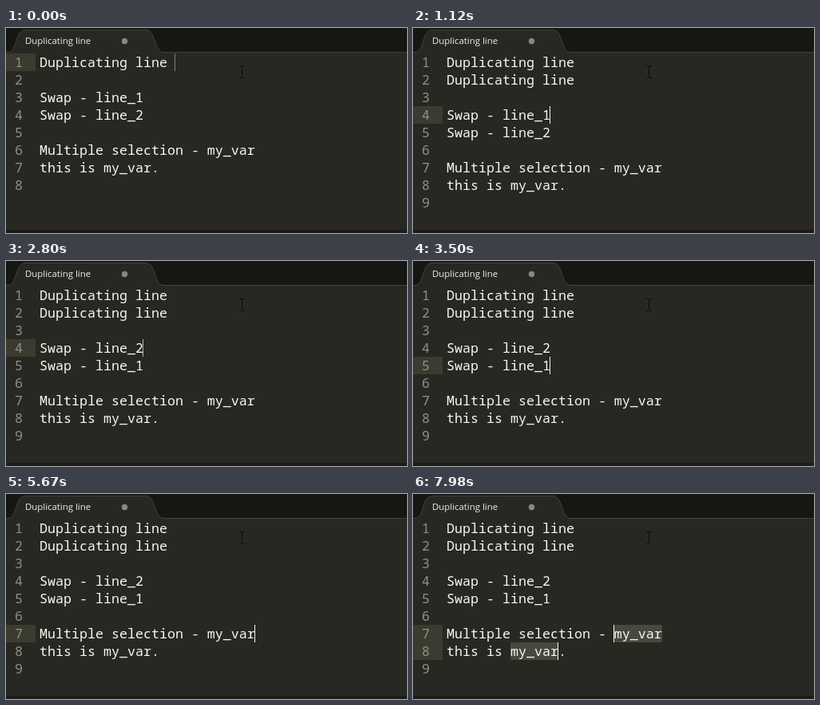
Animation of 502 by 257 pixels, one loop 8 s. Source, as an HTML page with a canvas:

```html
<!DOCTYPE html>
<html lang="en">
<head>
<meta charset="utf-8">
<title>Editor shortcuts</title>
<style>
  html, body { margin: 0; width: 100%; height: 100%; overflow: hidden; background: #272822; }
  canvas { display: block; }
</style>
</head>
<body>
<canvas id="stage" width="502" height="257"></canvas>
<script>
const ctx = document.getElementById('stage').getContext('2d');
const LOOP = 8000, TICK = 70;
const LEFT = 42, TOP = 32, CHAR = 10, ROW = 22;
const DUPLICATE = 350, SWAP = 2450, SELECT = 6580, SELECT_BOTH = 7000;

// Caret stops: arrival time, row, column, and when it fades out, is gone and fades in again
const stops = [
  { at: 0, row: 1, col: 17, back: 0 },
  { at: 350, row: 2, col: 17 },
  { at: 560, row: 2, col: 16, fade: 770, gone: 980 },
  { at: 840, row: 3, col: 0 },
  { at: 1120, row: 4, col: 13, fade: 1400, gone: 1540 },
  { at: 1540, row: 5, col: 13, fade: 1820, gone: 1960, back: 2380 },
  { at: 2450, row: 4, col: 13, fade: 2800, gone: 2940, back: 3430 },
  { at: 3500, row: 5, col: 13 },
  { at: 3710, row: 6, col: 0 },
  { at: 3990, row: 7, col: 13, fade: 4270, gone: 4480 },
  { at: 4620, row: 8, col: 13, fade: 4900, gone: 5040 },
  { at: 4970, row: 7, col: 13 },
  { at: 5180, row: 7, col: 18 },
  { at: 5320, row: 7, col: 20 },
  { at: 5670, row: 7, col: 27, fade: 5880, gone: 6090 },
  { at: 6580, row: 7, col: 21, fade: 6860, gone: 7000 },
  { at: 7000, row: 7, col: 21, fade: 7350, gone: 7490, back: 7910 }
];

const rowTop = row => TOP + (row - 1) * ROW;
const colLeft = col => LEFT + col * CHAR;

function rect(x, y, w, h, color) {
  ctx.fillStyle = color;
  ctx.fillRect(x, y, w, h);
}

function text(str, x, y, color, font) {
  ctx.font = font;
  ctx.fillStyle = color;
  ctx.fillText(str, x, y);
}

function caretAlpha(stop, t) {
  if (t >= stop.back) return t < stop.back + TICK ? 0.4 : 1;
  if (t >= stop.fade) return Math.max(0, 1 - (t - stop.fade + TICK) / (stop.gone - stop.fade + TICK));
  return 1;
}

function documentLines(t) {
  const title = 'Duplicating line';
  const swap = ['Swap - line_1', 'Swap - line_2'];
  if (t >= SWAP) swap.reverse();
  return [title, ...(t >= DUPLICATE ? [title] : []), '', ...swap, '',
    'Multiple selection - my_var', 'this is my_var.', ''];
}

function drawWindow() {
  rect(0, 0, 502, 257, '#272822');
  rect(0, 0, 502, 30, '#161713');
  rect(0, 253, 502, 4, '#1e1b19');

  ctx.beginPath();
  ctx.moveTo(-1, 30.5);
  ctx.lineTo(3, 30.5);
  ctx.bezierCurveTo(14, 30, 11, 2.5, 24, 2.5);
  ctx.lineTo(175, 2.5);
  ctx.bezierCurveTo(188, 2.5, 185, 30, 197, 30.5);
  ctx.lineTo(503, 30.5);
  ctx.fillStyle = '#272822';
  ctx.fill();
  ctx.strokeStyle = '#42433d';
  ctx.lineWidth = 1;
  ctx.stroke();

  text('Duplicating line', 24, 20, '#f0f0ec', '11.4px "Open Sans", sans-serif');
  ctx.beginPath();
  ctx.arc(148.5, 16.5, 3.7, 0, Math.PI * 2);
  ctx.fillStyle = '#888983';
  ctx.fill();
}

function drawSelection(row, col) {
  ctx.beginPath();
  ctx.roundRect(colLeft(col), rowTop(row), 60, ROW, 2);
  ctx.fillStyle = '#49483e';
  ctx.fill();
}

function drawMatchOutline(row, col) {
  ctx.beginPath();
  ctx.roundRect(colLeft(col) - 0.5, rowTop(row) + 0.5, 60, ROW, 2);
  ctx.strokeStyle = '#80817a';
  ctx.stroke();
}

function drawCaret(row, col, alpha) {
  ctx.globalAlpha = alpha;
  rect(colLeft(col) - 1, rowTop(row), 1, ROW, '#f8f8f0');
  ctx.globalAlpha = 1;
}

function drawPointer() {
  const color = '#0b0b09';
  rect(295, 48, 1, 14, color);
  for (const y of [47, 62]) {
    rect(292, y, 3, 1, color);
    rect(296, y, 3, 1, color);
  }
}

function draw(t) {
  const stop = stops.findLast(s => s.at <= t);
  const both = t >= SELECT_BOTH;
  const codeFont = '16.667px "Noto Sans Mono", monospace';

  drawWindow();
  rect(0, rowTop(stop.row), 37, ROW, '#3c3b30');
  if (both) rect(0, rowTop(8), 37, ROW, '#3c3b30');
  if (t >= SELECT) drawSelection(7, 21);
  if (both) drawSelection(8, 8);
  else if (t >= SELECT) drawMatchOutline(8, 8);

  documentLines(t).forEach((line, i) => {
    const baseline = rowTop(i + 1) + 17;
    text(String(i + 1), 11, baseline, '#8f908a', codeFont);
    text(line, LEFT, baseline, '#f8f8f2', codeFont);
  });

  const alpha = caretAlpha(stop, t);
  drawCaret(stop.row, stop.col, alpha);
  if (both) drawCaret(8, 14, alpha);
  drawPointer();
}

function frame() {
  const t = performance.now() % LOOP;
  draw(Math.floor(t / TICK) * TICK);
  requestAnimationFrame(frame);
}
frame();
</script>
</body>
</html>
```
